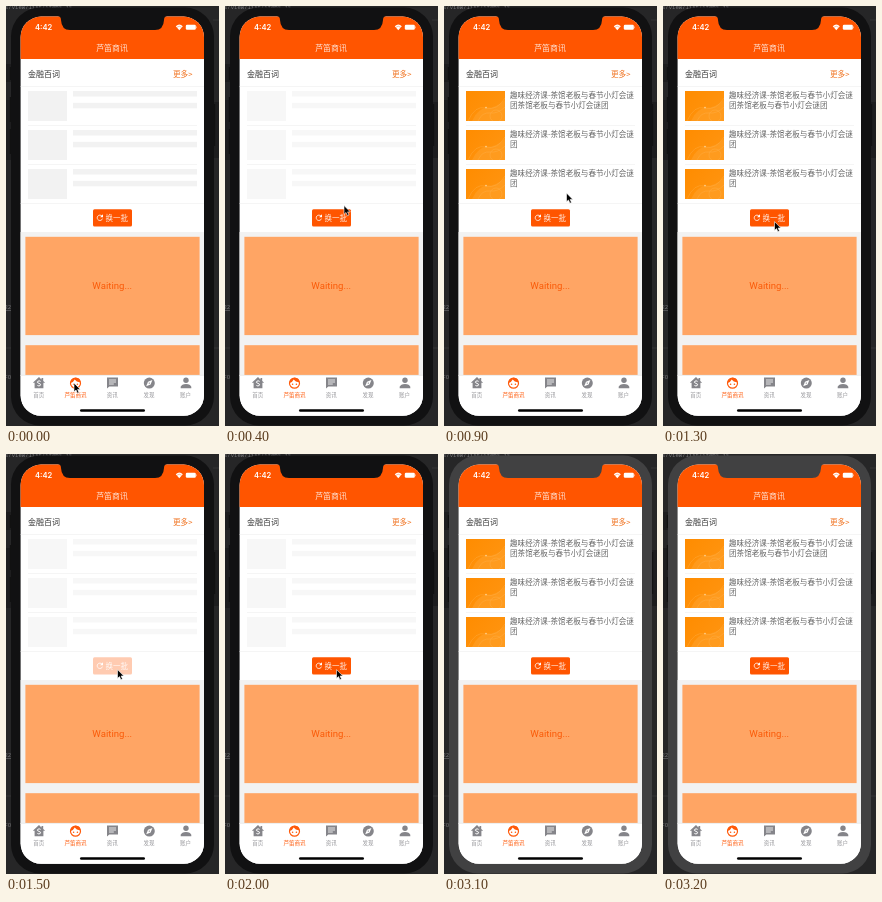
An HTML page for the animation above (3.3 s loop, 213 by 420 pixels).

```html
<!DOCTYPE html>
<html lang="zh">
<head>
<meta charset="utf-8">
<title>Loading list</title>
<style>
  html, body { margin: 0; width: 100%; height: 100%; overflow: hidden; background: #262627; }
  svg { display: block; width: 100vw; height: 100vh; }
  text { font-family: "Noto Sans CJK SC", "Noto Sans CJK", "Noto Sans", sans-serif; }
  .mono { font: 5.6px "Noto Sans Mono", monospace; fill: #77777a; }
  .mid { text-anchor: middle; }
  .tab { font-size: 5.5px; text-anchor: middle; }
  .latin { font-family: Inter, Roboto, sans-serif; }
</style>
</head>
<body>
<svg viewBox="0 0 213 420" preserveAspectRatio="none">
  <defs>
    <clipPath id="screenClip"><rect x="14.6" y="10.6" width="183.4" height="399.2" rx="20.5"/></clipPath>
    <clipPath id="thumbClip"><rect width="39" height="30"/></clipPath>
    <linearGradient id="thumbFill" x2="1" y2=".6">
      <stop stop-color="#ff8c00"/><stop offset="1" stop-color="#ff9410"/>
    </linearGradient>
    <g id="thumb" clip-path="url(#thumbClip)">
      <rect width="39" height="30" fill="url(#thumbFill)"/>
      <path d="M6 30Q12 17 21 17T39 9V30Z" fill="#ffa128" opacity=".6"/>
      <g fill="none" stroke="#ffc16a" stroke-width=".5" opacity=".5">
        <path d="M2 30Q9 14 20 17T39 7M12 30Q16 21 24 22T39 16"/>
        <circle cx="30" cy="25" r="6"/>
      </g>
      <circle cx="20" cy="16.6" r=".8" fill="#ffd596"/>
    </g>
  </defs>

  <!-- desktop behind the phone -->
  <rect width="213" height="420" fill="#262627"/>
  <g fill="#1d1d1e">
    <rect y="58" width="7" height="18"/><rect y="94" width="7" height="60"/>
    <rect x="207" y="96" width="6" height="56"/>
  </g>
  <path d="M0 342H6M207 342H213M207 14H213" stroke="#3c3c3e" stroke-width=".7"/>
  <text class="mono" x="-1" y="2.6">s/view/list/items.js</text>
  <text class="mono" x="-1.5" y="303" text-decoration="underline">22</text>
  <text class="mono" x="-1.5" y="373">FO</text>

  <!-- phone -->
  <path d="M4.6 61V74M4.6 91V116M4.6 123V148M208.4 98V140" stroke="#111" stroke-width="1.6"/>
  <rect id="bezel" x="5" y="1.5" width="203" height="418" rx="29"/>
  <g clip-path="url(#screenClip)">
    <rect x="14" y="10" width="185" height="400" fill="#fff"/>
    <rect x="14" y="10" width="185" height="43" fill="#ff5500"/>
    <text class="latin" x="29" y="24" font-size="7.6" font-weight="600" fill="#fff">4:42</text>
    <path d="M169.8 20.2Q173.3 17 176.8 20.2L173.3 24.2Z" fill="#fff"/>
    <path d="M170.9 21.3Q173.3 19.2 175.7 21.3" fill="none" stroke="#ff5500" stroke-width=".4"/>
    <rect x="179.8" y="18.8" width="10" height="5" rx="1.3" fill="#fff"/>
    <path d="M190.5 20.4V22.2" stroke="#ffc3a3" stroke-width=".7"/>
    <text class="mid" x="106" y="45.3" font-size="7.9" fill="#ffe6d9">芦笛商讯</text>

    <text x="22" y="70.5" font-size="8" font-weight="500" fill="#333">金融百词</text>
    <text x="167" y="70.5" font-size="7.6" fill="#f0701c">更多&gt;</text>
    <path d="M14 80.5H199M22 119.5H191M22 158.5H191M14 197.5H199" stroke="#f1f1f1" stroke-width=".7"/>
    <g id="skeleton" fill="#f2f2f2"></g>
    <g id="content" font-size="7.58" fill="#666"></g>

    <g id="button">
      <rect x="87" y="203.2" width="39" height="17.2" rx="1.5" fill="#ff5500"/>
      <path d="M96 210.1A2.7 2.7 0 1 0 96.5 212.6" fill="none" stroke="#fff" stroke-width=".8"/>
      <path d="M97 208.3V211.2H94.1Z" fill="#fff"/>
      <text x="99.4" y="214.7" font-size="7.5" fill="#ffeee5">换一批</text>
    </g>

    <rect x="14" y="226" width="185" height="144" fill="#f2f2f2"/>
    <g fill="#ffa564">
      <rect x="19.4" y="230.8" width="174.2" height="98.3"/>
      <rect x="19.4" y="339.2" width="174.2" height="31"/>
    </g>
    <text class="mid" x="106.2" y="283.4" font-size="9.6" fill="#fa5a08" style="font-family:Roboto,Inter,sans-serif">Waiting...</text>

    <rect x="14" y="369" width="185" height="41" fill="#fff"/>
    <path d="M14 369.3H199" stroke="#dedede" stroke-width=".6"/>
    <g fill="#85858a" transform="translate(0 -.4)">
      <path d="M33 371.5L26.8 377.2H28.6V382.7H37.4V377.2H39.2L37.2 375.3V372.5H35.5V373.8Z"/>
      <path d="M34.6 375.8Q33 374.6 31.7 375.8T33 377.8T34.3 379.8T31.4 379.8" fill="none" stroke="#fff" stroke-width="1"/>
      <path d="M101 372H112V380.8H103.3L101 383Z"/>
      <path d="M103 374.4H110M103 376.4H110M103 378.4H107.8" stroke="#fff" stroke-width=".8"/>
      <circle cx="143.3" cy="377.5" r="5.5"/>
      <path d="M146.4 374.4L144.6 378.8L140.2 380.6L142 376.2Z" fill="#fff"/>
      <circle cx="143.3" cy="377.5" r=".7"/>
      <circle cx="180" cy="374.7" r="2.7"/>
      <path d="M174.7 382.7V381.2Q175.6 378.8 180 378.5Q184.4 378.8 185.3 381.2V382.7Z"/>
    </g>
    <circle cx="69.5" cy="377.2" r="5" fill="#fff" stroke="#ff5a0a" stroke-width="1.2"/>
    <path d="M64.6 377Q67.8 376 68.7 373.6Q70.8 376.5 74.4 376.1Q74.5 371.8 69.5 371.8Q64.6 372.2 64.6 377Z" fill="#ff5a0a"/>
    <g fill="#ff5a0a"><circle cx="67.6" cy="378.3" r=".8"/><circle cx="71.4" cy="378.3" r=".8"/></g>
    <g id="tabs"></g>
    <rect x="74" y="403.2" width="65" height="2.6" rx="1.3" fill="#000"/>
  </g>
  <path id="notch" d="M52 10Q55 10.6 55 14Q55.5 24 64 24H149Q157.5 24 158 14Q158 10.6 161 10Z"/>

  <path id="cursor" d="M0 0V8.8L2 7L3.4 10.2L5 9.5L3.6 6.4H6.3Z" fill="#000" stroke="#fff" stroke-width=".6"/>
</svg>
<script>
const LOOP = 3300, STEP = 100;
const get = id => document.getElementById(id);

// list rows
const head = "趣味经济课-茶馆老板与春节小灯会谜";
const rows = [[head, "团茶馆老板与春节小灯会谜团"], [head, "团"], [head, "团"]];
const box = (x, y, w, h) => `<rect x="${x}" y="${y}" width="${w}" height="${h}"/>`;
rows.forEach((lines, i) => {
  const y = 85 + 39 * i;
  get("skeleton").innerHTML += box(22, y, 39, 30) + box(67, y, 124, 5.5) + box(67, y + 11.8, 124, 5.5);
  get("content").innerHTML += `<use href="#thumb" x="22" y="${y}"/>` +
    lines.map((s, n) => `<text x="66" y="${y + 7.4 + 9.7 * n}">${s}</text>`).join("");
});

["首页", "芦笛商讯", "资讯", "发现", "账户"].forEach((name, i) => {
  get("tabs").innerHTML +=
    `<text class="tab" x="${32.8 + 36.7 * i}" y="390.9" fill="${i === 1 ? "#ff5a0a" : "#96969a"}">${name}</text>`;
});

// each track: [time, values...]
const cursorTrack = [[0, 68, 377], [100, 70, 368], [400, 119, 199.5], [900, 122.5, 187],
  [1300, 111.5, 215.6], [2700, 111.5, 215.6], [3100, 150, -15]];
const pressTrack = [[0, 1], [1300, 1], [1400, .3], [1500, .3], [1700, 1]];
const pulseTrack = [[0, 1], [400, .6], [800, 1], [1500, .6], [1750, 1], [2000, .6], [2300, 1]];

function sample(track, t) {
  const n = track.findIndex(k => k[0] > t);
  if (n < 0) return track[track.length - 1].slice(1);
  const a = track[n - 1], b = track[n];
  const p = (t - a[0]) / (b[0] - a[0]), e = p * p * (3 - 2 * p);
  return a.slice(1).map((v, i) => v + (b[i + 1] - v) * e);
}

function draw(t) {
  const loaded = (t >= 700 && t < 1500) || t >= 2300;
  const blurred = t >= 3100;
  get("skeleton").setAttribute("opacity", loaded ? 0 : sample(pulseTrack, t)[0]);
  get("content").setAttribute("opacity", loaded ? 1 : 0);
  get("button").setAttribute("opacity", sample(pressTrack, t)[0]);
  get("cursor").setAttribute("transform", `translate(${sample(cursorTrack, t)})`);
  for (const id of ["bezel", "notch"]) get(id).setAttribute("fill", blurred ? "#414142" : "#111112");
}

const start = performance.now();
function tick() {
  const t = (performance.now() - start) % LOOP;
  draw(Math.floor(t / STEP) * STEP);
  requestAnimationFrame(tick);
}
tick();
</script>
</body>
</html>
```
